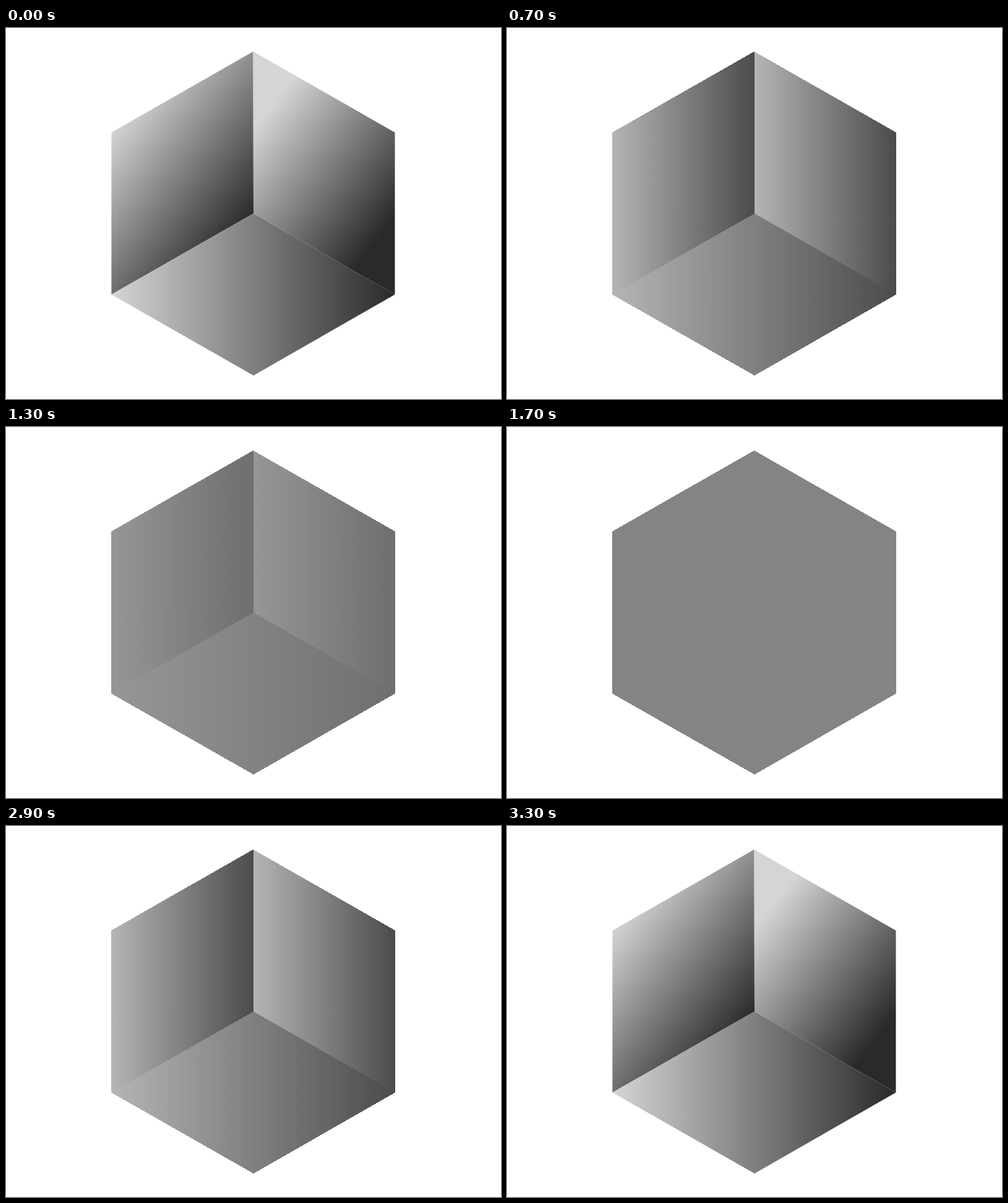
An HTML page that plays this animation: 800 px wide and 600 px high, repeating every 3500 ms.

```html
<!DOCTYPE html>
<html lang="en">
<head>
<meta charset="utf-8">
<title>Shaded cube</title>
<style>
  html, body { margin: 0; width: 100%; height: 100%; overflow: hidden; background: #fff; }
  svg { display: block; width: 100vw; height: 100vh; }
</style>
</head>
<body>
<svg id="stage" viewBox="0 0 800 600"></svg>
<script>
const LOOP = 3500;
const stage = document.getElementById('stage');

function add(parent, tag, attrs) {
  const node = document.createElementNS('http://www.w3.org/2000/svg', tag);
  for (const key in attrs) node.setAttribute(key, attrs[key]);
  return parent.appendChild(node);
}

function gradient(id, [x1, y1, x2, y2], light, dark) {
  const node = add(stage, 'linearGradient', { id, x1, y1, x2, y2, gradientUnits: 'userSpaceOnUse' });
  add(node, 'stop', { offset: 0, 'stop-color': light });
  add(node, 'stop', { offset: 1, 'stop-color': dark });
}

// Three inner faces of a hexagon with the given left and right sides.
function facesOf(left, right) {
  return {
    left: `${left},169 399.5,38 400,300 ${left},431`,
    right: `399.5,38 ${right},169 ${right},431 400,300`,
    floor: `${left},431 400,300 ${right},431 400,562`
  };
}

function cube(name, faces, axes, light, dark, rendering) {
  const group = add(stage, 'g', { 'shape-rendering': rendering });
  for (const face in faces) {
    const id = `${name}-${face}`;
    gradient(id, axes[face], light, dark);
    add(group, 'polygon', { points: faces[face], fill: `url(#${id})` });
  }
  return group;
}

// Slanted shading runs through the middle of a wall.
const slant = (x, y) => [x - 106, y - 80, x + 106, y + 80];
const floorAxis = [170, 0, 629, 0];

cube('flat', facesOf(170, 629),
  { left: [170, 0, 400, 0], right: [400, 0, 629, 0], floor: floorAxis },
  '#c2c2c2', '#3e3e3e', 'crispEdges');

const veil = add(stage, 'polygon', {
  points: '399.5,38 629,169 629,431 400,562 170,431 170,169',
  fill: '#848484', 'shape-rendering': 'crispEdges'
});

const cover = add(stage, 'g', {});
add(cover, 'rect', { width: 800, height: 600, fill: '#fff' });
cover.append(cube('deep', facesOf(170.4, 628.5),
  { left: slant(285, 234.5), right: slant(514, 234.5), floor: floorAxis },
  '#d6d4d5', '#2a2a2a', 'auto'));

// Each step is [start time, opacity], held until the next one.
function play(node, steps) {
  const frames = steps.map(([time, opacity]) => ({ offset: time / LOOP, opacity, easing: 'steps(1, end)' }));
  frames.push({ offset: 1, opacity: steps[0][1] });
  node.animate(frames, { duration: LOOP, iterations: Infinity }).startTime = 0;
}

play(veil, [
  [0, 0], [700, 0.2], [900, 0.3], [1100, 0.5], [1300, 0.7], [1500, 0.75],
  [1700, 1], [2700, 0.75], [2900, 0.2], [3100, 0]
]);
play(cover, [[0, 1], [500, 0], [3300, 1]]);
</script>
</body>
</html>
```
